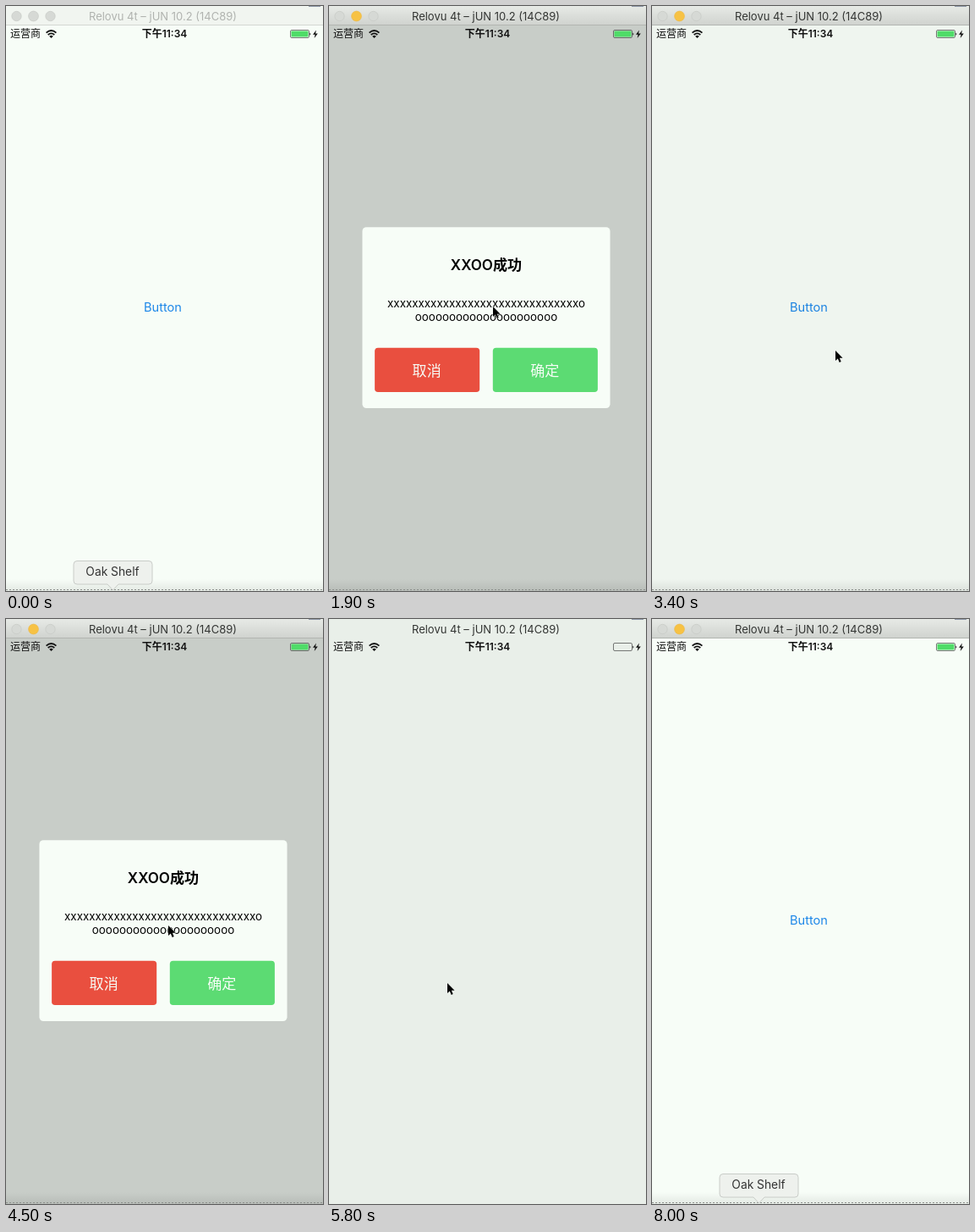
An HTML page that plays this animation: 375x691 px, repeating every 8100 ms.

```html
<!DOCTYPE html>
<html lang="zh">
<head>
<meta charset="utf-8">
<title>Dialog demo</title>
<style>
  html, body { margin: 0; width: 100%; height: 100%; overflow: hidden; background: #f7fdf7; }
  svg { display: block; font-family: Inter, "Noto Sans CJK SC", "Noto Sans CJK JP", "Noto Sans CJK", sans-serif; }
  .mid { text-anchor: middle; }
</style>
</head>
<body>
<svg width="375" height="691" viewBox="0 0 375 691">
  <defs>
    <linearGradient id="barOn" x2="0" y2="1">
      <stop offset="0" stop-color="#e7eae6"/><stop offset="1" stop-color="#cfd2ce"/>
    </linearGradient>
    <linearGradient id="footFill" x2="0" y2="1">
      <stop offset="0" stop-opacity="0"/><stop offset="1" stop-opacity=".08"/>
    </linearGradient>
    <clipPath id="screen"><rect y="23" width="375" height="668"/></clipPath>
  </defs>

  <rect width="375" height="691" fill="#f7fdf7"/>
  <text id="button" class="mid" x="185.5" y="361" font-size="14.6" fill="#1d87e8">Button</text>
  <rect id="shade" width="375" height="691"/>

  <g clip-path="url(#screen)">
    <g id="dialog">
      <rect x="-150" y="-112.5" width="300" height="225" rx="5" fill="#f7fdf7"/>
      <text class="mid" y="-59.5" font-size="17.5" font-weight="600">XXOO成功</text>
      <g class="mid" font-size="13.7">
        <text id="line1" y="-12.5"/>
        <text id="line2" y="4.5"/>
      </g>
      <rect x="-135" y="37.5" width="127" height="55" rx="4" fill="#e94f3f"/>
      <rect x="8" y="37.5" width="127" height="55" rx="4" fill="#5cdb73"/>
      <g class="mid" font-size="17.5" fill="#f7fdf7">
        <text x="-72" y="72">取消</text>
        <text x="71" y="72">确定</text>
      </g>
    </g>
  </g>

  <rect id="foot" y="677" width="375" height="14" fill="url(#footFill)"/>
  <path id="dots" d="M0 689.5H375" stroke="#8b8f8b" stroke-dasharray="2 2"/>

  <g id="bar">
    <rect id="barFill" width="375" height="23"/>
    <path id="barLine" d="M0 22.5H375"/>
    <g fill="#d6d9d5" stroke="#c6c9c5" stroke-width=".7">
      <circle cx="12.5" cy="12" r="5.7"/><circle cx="52.5" cy="12" r="5.7"/>
    </g>
  </g>
  <rect x="358" width="14" height="1" fill="#8c95a5"/>
  <circle id="light" cx="32.5" cy="12" r="5.9" stroke-width=".7"/>
  <text id="title" class="mid" x="185.5" y="16.7" font-size="13">Relovu 4t – jUN 10.2 (14C89)</text>

  <g fill="#111">
    <text x="5" y="37.3" font-size="12">运营商</text>
    <text class="mid" x="187.5" y="37.3" font-size="12" font-weight="600">下午11:34</text>
    <g fill="none" stroke="#111" stroke-width="1.8">
      <path d="M47.6 31.6Q53.5 26.4 59.4 31.6"/>
      <path d="M49.7 34Q53.5 30.8 57.3 34"/>
    </g>
    <path d="M53.5 38L51.2 35.7Q53.5 33.8 55.8 35.7Z"/>
    <rect x="336.5" y="28.5" width="22" height="9" rx="1.5" fill="none" stroke="#444" stroke-width=".7"/>
    <rect id="charge" x="337.5" y="29.5" width="20" height="7" rx=".8" fill="#4fdc68"/>
    <path d="M359.4 31.4Q361.4 33 359.4 34.7Z"/>
    <path d="M367 28.5L363 33.8H365.6L364.7 38L368.8 32.4H366.1Z"/>
  </g>

  <g id="tip">
    <path id="bubble" d="M84 655.5H169Q173 655.5 173 659.5V679Q173 683 169 683H133L126.5 690L120 683H84Q80 683 80 679V659.5Q80 655.5 84 655.5Z"
      fill="#eef1ed" stroke="#c9ccc8"/>
    <text class="mid" x="126" y="673" font-size="13.8" fill="#333">Oak Shelf</text>
  </g>

  <path id="cursor" d="M0 0V12L2.8 9.5L4.7 14L6.7 13.1L4.9 8.8H8.6Z" stroke="#f7fdf7" paint-order="stroke"/>
</svg>

<script>
const LOOP = 8100, STEP = 100;
const $ = id => document.getElementById(id);
const set = (id, attrs) => {
  for (const k in attrs) $(id).setAttribute(k, attrs[k]);
};
const show = (on, ...ids) => ids.forEach(id => set(id, { visibility: on ? 'visible' : 'hidden' }));

const progress = (t, from, to) => Math.min(1, Math.max(0, (t - from) / (to - from)));
const smooth = p => p * p * (3 - 2 * p);
const easeOut = p => 1 - (1 - p) ** 2;
const spring = (s, damping, speed) => Math.exp(-damping * s) * Math.cos(speed * s);

$('line1').textContent = 'x'.repeat(31) + 'o';
$('line2').textContent = 'o'.repeat(21);

const SHOWS = [
  { press: 1400, open: 1500, close: 3260 },
  { press: 4000, open: 4100, close: 5700 }
];

const ENTRY = { x: 126, y: 692 };
const MOVES = [
  { from: 100, to: 1200, x: 194, y: 355 },
  { from: 2400, to: 2900, x: 217, y: 407 },
  { from: 3400, to: 3800, x: 192, y: 362 },
  { from: 4900, to: 5400, x: 140, y: 430 },
  { from: 6600, to: 7500, ...ENTRY }
];

function pointer(t) {
  let { x, y } = ENTRY;
  for (const m of MOVES) {
    const p = smooth(progress(t, m.from, m.to));
    x += (m.x - x) * p;
    y += (m.y - y) * p;
  }
  return `translate(${x} ${y})`;
}

// The dialog drops in while its stretched size springs back.
function dialogPose(s) {
  const y = 355.5 - 984 * spring(s, 9, 5.15);
  const stretch = spring(s, 4.5, 7.35);
  return `translate(186 ${y}) scale(${1 + .142 * stretch} ${1 + .306 * stretch})`;
}

function drawShow(t) {
  const { press, open, close } = SHOWS[t < SHOWS[1].press ? 0 : 1];
  const opened = t > open, closed = t > close;
  const shade = closed ? Math.exp(-(t - close) / 74) : easeOut(progress(t, open, open + 600));
  // The window chrome blinks out on the first step of each change.
  const opening = opened && t <= open + STEP;
  const closing = closed && t <= close + STEP;
  const pressed = t >= press && t <= open;

  show(opened && !closed, 'dialog');
  set('dialog', { transform: dialogPose(Math.max(0, t - open) / 1000) });
  set('shade', { opacity: shade * .217 });
  set('button', { opacity: pressed ? .2 : 1 });
  show(!opening && !closing, 'bar', 'foot', 'button');
  show(!closing, 'light', 'charge', 'dots');
}

function drawWindow(active) {
  set('barFill', { fill: active ? 'url(#barOn)' : '#f1f5f0' });
  set('barLine', { stroke: active ? '#b2b5b1' : '#d3d6d2' });
  set('light', active ? { fill: '#f7c244', stroke: '#ecb945' } : { fill: '#d6d9d5', stroke: '#c6c9c5' });
  set('title', { fill: active ? '#333533' : '#b0b3af' });
}

function draw(t) {
  drawShow(t);
  drawWindow(t >= 800);
  show(t >= 7600 || t < 200, 'tip');
  set('cursor', { transform: pointer(t) });
}

function tick() {
  const t = performance.now() % LOOP;
  draw(Math.floor(t / STEP) * STEP);
  requestAnimationFrame(tick);
}
tick();
</script>
</body>
</html>
```
